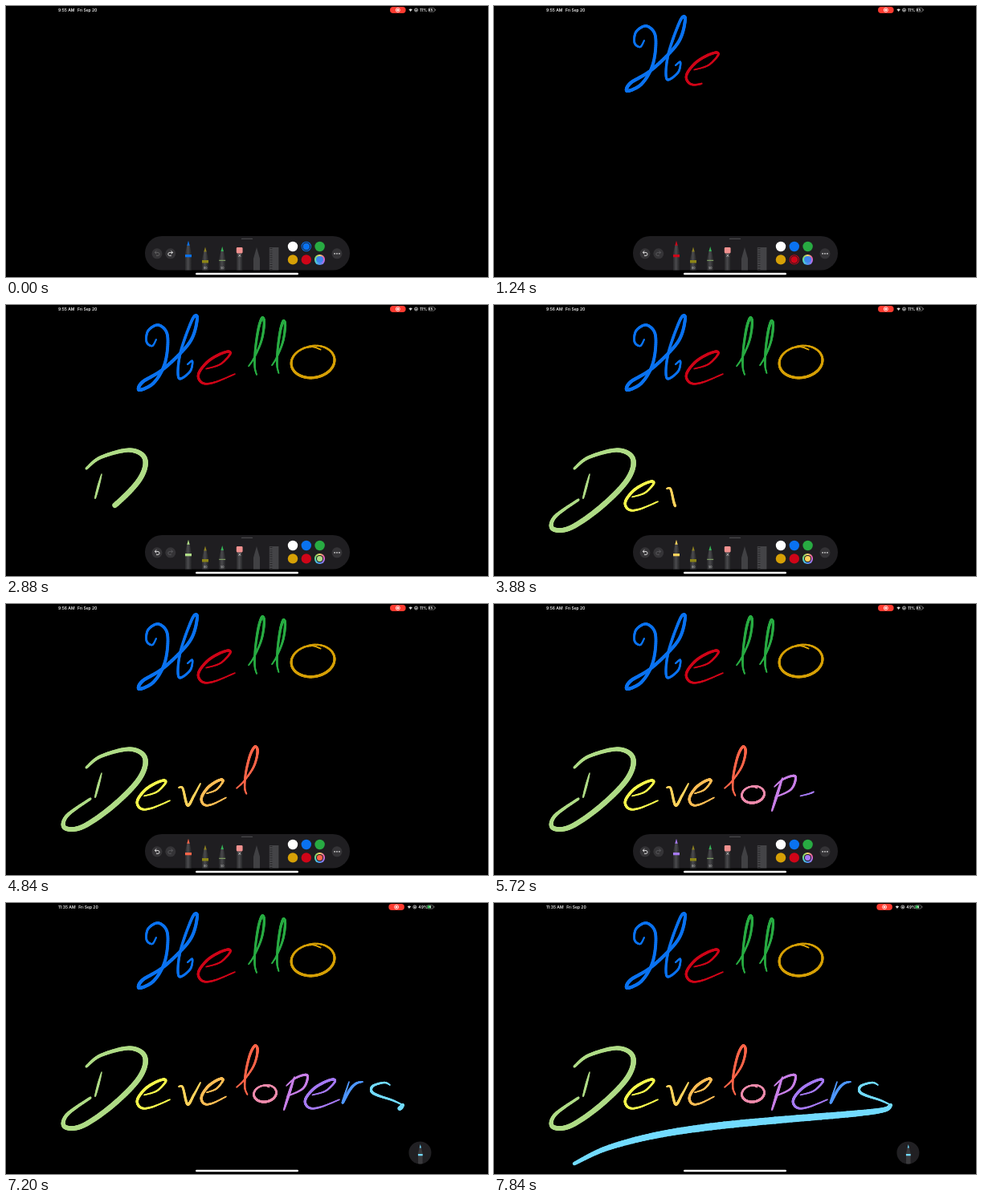
An HTML page with a canvas that plays this animation: 600x338 px, repeating every 7880 ms.

```html
<!DOCTYPE html>
<html lang="en">
<head>
<meta charset="utf-8">
<title>Hello Developers</title>
<style>
  html, body { margin: 0; width: 100%; height: 100%; overflow: hidden; background: #000; }
  canvas, svg { position: absolute; left: 0; top: 0; width: 600px; height: 338px; }
  text { font: 600 5px Inter, sans-serif; fill: #eee; }
  .wheel { position: absolute; left: 384.3px; top: 310.2px; width: 12.4px; height: 12.4px; border-radius: 50%;
    background: conic-gradient(#f5d76a, #ef5da8, #a874f0, #4b8df0, #4fd0d8, #7fdc6a, #f5d76a); }
  .wheel i { position: absolute; inset: 2px; border-radius: 50%; }
</style>
</head>
<body>
<canvas id="ink" width="600" height="338"></canvas>

<svg viewBox="0 0 600 338" fill="none">
  <defs>
    <linearGradient id="barrel">
      <stop stop-color="#29292b"/><stop offset=".45" stop-color="#4a4a4d"/><stop offset="1" stop-color="#222224"/>
    </linearGradient>
    <clipPath id="trayClip"><rect x="173" y="287" width="255" height="42.5" rx="21"/></clipPath>
    <clipPath id="screenClip"><rect width="541.5" height="338"/></clipPath>
    <clipPath id="puckClip"><circle r="18.5"/></clipPath>
    <path id="arrow" d="M-.7 -3.4L-2.8 -1.4L-.7 .6M-2.6 -1.4H1Q3 -1.2 3 .7T1 2.6H-1" stroke-width=".9"/>
  </defs>

  <text id="clock" x="65" y="6.8"></text>
  <text id="date" y="6.8">Fri Sep 20</text>
  <g id="status">
    <rect x="478" y="1" width="19.6" height="8" rx="4" fill="#ff3b30"/>
    <circle cx="487.8" cy="5" r="2.5" stroke="#fff" stroke-width=".8"/>
    <circle cx="487.8" cy="5" r="1.3" fill="#fff"/>
    <path d="M501.4 4.2Q503.6 2.6 505.8 4.2L503.6 7Z" fill="#ddd"/>
    <circle cx="510.5" cy="5" r="2" stroke="#ddd" stroke-width=".8"/>
    <path d="M509.7 4.6h1.6v1.4h-1.6z" fill="#ddd"/>
    <text id="charge" x="515" y="6.8"></text>
    <rect x="525.8" y="2.7" width="7.8" height="4.4" rx="1.3" stroke="#999" stroke-width=".6"/>
    <rect id="level" x="526.4" y="3.3" height="3.2" rx=".7"/>
    <path d="M530.2 2.6l-1.6 2.6h1.4l-.5 2.1 1.8-2.8h-1.4z" fill="#fff"/>
    <path d="M534.6 4v1.8" stroke="#999" stroke-width=".7"/>
  </g>

  <g id="tray">
    <rect x="173" y="287" width="255" height="42.5" rx="21" fill="#1f1e21"/>
    <path d="M293.5 290.4h13" stroke="#48484b" stroke-width="1.3" stroke-linecap="round"/>
    <path d="M188 308.8h0M204.8 308.8h0M412 308.8h0" stroke="#353437" stroke-width="13" stroke-linecap="round"/>
    <use id="undo" href="#arrow" transform="translate(188 308.8)"/>
    <use id="redo" href="#arrow" transform="translate(204.8 308.8) scale(-1 1)"/>
    <path d="M409.1 308.8h6" stroke="#ddd" stroke-width="1.8" stroke-linecap="round" stroke-dasharray="0 2.9"/>
    <g id="tools" clip-path="url(#trayClip)">
      <path d="M287 308h7.6v22h-7.6z" fill="url(#barrel)"/>
      <rect x="286.8" y="301" width="7.8" height="7.4" rx="1.4" fill="#f0918f"/>
      <path d="M289.4 309.8l2.8 3m0-3l-2.8 3" stroke="#ccc" stroke-width=".8"/>
      <path d="M312 301l-4 14v15h8v-15z" fill="#414144"/>
      <path d="M327.8 301h11.6v29h-11.6z" fill="#444447"/>
      <path d="M330 302v28" stroke="#1f1e21" stroke-width="3" stroke-dasharray=".7 2.2"/>
      <text x="246" y="327.5" style="font-size:3.5px;fill:#aaa">80</text>
      <text x="267.2" y="327.5" style="font-size:3.5px;fill:#aaa">50</text>
    </g>
    <g id="swatches"></g>
  </g>

  <g clip-path="url(#screenClip)">
    <g id="puck">
      <circle r="18.5" fill="#212023"/>
      <g clip-path="url(#puckClip)">
        <path d="M-1 -8L-3.2 1V22H4.2V1L2 -8Z" fill="#3a3a3d"/>
        <path class="accent" d="M.5 -14l-1.5 6h3zM-3.3 2h7.6v3h-7.6z"/>
      </g>
    </g>
  </g>
  <rect x="236" y="332.7" width="128" height="2.6" rx="1.3" fill="#fff"/>
</svg>
<div class="wheel" id="wheel"><i id="gap"></i><i id="core"></i></div>

<script>
const LOOP = 7880, CUT = 6600, PICK_LEAD = 100;
const $ = id => document.getElementById(id);
const ctx = $('ink').getContext('2d');
const clamp = v => Math.max(0, Math.min(1, v));
const lerp = (a, b, k) => a + (b - a) * k;

const BLUE = '#0a72f0', RED = '#cf0518', GREEN = '#28ab42', GOLD = '#d6a006', CYAN = '#72dbff';
const LIME = '#afdc86', LEMON = '#f6f84c', AMBER = '#ffd35c', PEACH = '#ffbd55', CORAL = '#ff6549';
const PINK = '#ee8bac', ORCHID = '#c97fe8', VIOLET = '#a67af5', SKY = '#4f97ff';

const path = text => text.split(' ').map(s => s.split(',').map(Number));
// Letter shapes in a unit box, placed wherever the letter occurs.
const E = path('.22,.54 .6,.4 .86,.1 .82,0 .56,.1 .26,.32 .04,.63 .02,.85 .17,1 .48,.95 1,.7');
const L = path('0,.85 .35,.7 .8,.4 .97,.1 .85,0 .62,.18 .42,.55 .38,.85 .5,1');
const place = (shape, x, y, w, h) => shape.map(([u, v]) => [x + u * w, y + v * h]);
// Counter-clockwise loop that starts inside and overlaps its own beginning.
const oval = (cx, cy, rx, ry) => Array.from({ length: 16 }, (_, i) => {
  const a = -1.1 - i * .48, r = 1 - .2 * Math.exp(-i);
  return [cx + rx * r * Math.cos(a), cy + ry * r * (Math.sin(a) - .1 * Math.cos(a))];
});

// Samples a Catmull-Rom curve through the points.
function smooth(p) {
  const at = i => p[Math.max(0, Math.min(p.length - 1, i))];
  return Array.from({ length: (p.length - 1) * 14 + 1 }, (_, n) => {
    const i = Math.floor(n / 14), t = n / 14 - i;
    return [0, 1].map(d => {
      const [a, b, c, e] = [-1, 0, 1, 2].map(j => at(i + j)[d]);
      return b + t * (c - a + t * (2 * a - 5 * b + 4 * c - e + t * (3 * b - a - 3 * c + e))) / 2;
    });
  });
}

const strokes = [];
const stroke = (color, start, time, width, points) =>
  strokes.push({ color, start, time, width, pts: smooth(points) });

stroke(BLUE, 20, 840, 4.2, path('187,43 182,51 175,46 177,32 190,25 201,38 198,72 184,97 166,106 170,96 197,79 229,46 238,17 232,18 217,60 215,91 229,83 232,70 226,74'));
stroke(RED, 1000, 270, 3.4, place(E, 239, 58, 46, 40));
stroke(GREEN, 1460, 220, 3.4, place(L, 302, 16, 20, 71));
stroke(GREEN, 1740, 200, 3.4, place(L, 331, 20, 17, 65));
stroke(GOLD, 2060, 310, 3.3, oval(382, 70.7, 27, 20));
stroke(LIME, 2480, 90, 3, path('119,211 111,241'));
stroke(LIME, 2620, 470, 6.6, path('100,204 118,190 154,181 173,192 166,218 133,252 95,278 73,279 76,264 105,243'));
stroke(LEMON, 3320, 320, 3.5, place(E, 163, 220, 41, 36));
stroke(AMBER, 3770, 230, 3.3, path('215,229 220,230 226,251 234,239 242,224'));
stroke(PEACH, 4180, 300, 3.4, place(E, 243, 219, 31, 32));
stroke(CORAL, 4620, 230, 3.3, place(L, 287, 178, 27, 61));
stroke(PINK, 4960, 210, 3, oval(322.5, 237.5, 14, 10.5));
stroke(ORCHID, 5290, 110, 3.5, path('359,217 353,236 346,258'));
stroke(ORCHID, 5420, 170, 3, path('349,228 361,218 375,215 370,231 350,241'));
stroke(VIOLET, 5690, 290, 3.4, place(E, 372, 220, 43, 36));
stroke(SKY, 6130, 260, 3.3, path('427,223 419,249 428,233 436,225 444,223'));
stroke(CYAN, 6740, 400, 3.2, path('478,227 471,224 457,228 455,235 463,240 481,246 494,252'));
stroke(CYAN, 7140, 560, 9, path('494,252 485,258 445,263 350,271 270,279 200,290 140,306 100,325'));

const basics = ['#fff', BLUE, GREEN, GOLD, RED];
$('swatches').innerHTML = basics.map((c, i) =>
  `<g transform="translate(${357 + i % 3 * 16.8} ${i < 3 ? 300 : 316.4})"><circle r="6.2" fill="${c}"/>
   <circle class="ring" r="4.8" stroke="#1f1e21"/></g>`).join('');

const pen = (x, top, tip, bandY, bandH, band) => `
  <path d="M${x - 1.5} ${top + 5}l-2.5 11V330h8V${top + 16}l-2.5 -11z" fill="url(#barrel)"/>
  <path ${tip} d="M${x} ${top}l-1.7 6h3.4z"/><path ${band} d="M${x - 4} ${bandY}h8v${bandH}h-8z"/>`;
const fill = c => `fill="${c}"`;
$('tools').insertAdjacentHTML('afterbegin',
  pen(227, 292.8, 'class="accent"', 309.9, 3.3, 'class="accent"') +
  pen(248, 300.5, fill('#8c8020'), 317, 3.6, fill('#8c8517')) +
  pen(269.2, 300, fill('#35b557'), 316.8, 1.3, fill('#7c9a62')));
const rings = document.querySelectorAll('.ring');
const accents = document.querySelectorAll('.accent');

function drawInk(t) {
  ctx.clearRect(0, 0, 600, 338);
  ctx.lineCap = 'round';
  for (const { color, start, time, width, pts } of strokes) {
    const last = Math.floor(clamp((t - start) / time) * (pts.length - 1));
    ctx.strokeStyle = color;
    for (let i = 0; i < last; i++) {
      // Pen pressure swells towards the middle of each stroke.
      ctx.lineWidth = width * (.45 + .55 * Math.sin(Math.PI * i / pts.length));
      ctx.beginPath();
      ctx.moveTo(...pts[i]);
      ctx.lineTo(...pts[i + 1]);
      ctx.stroke();
    }
  }
}

function drawStatus(t, late) {
  $('clock').textContent = late ? '11:35 AM' : t < 3240 ? '9:55 AM' : '9:56 AM';
  $('date').setAttribute('x', late ? 90.3 : 89);
  $('status').setAttribute('transform', `translate(${late ? -1.7 : 0} 0)`);
  $('charge').textContent = late ? '49%' : '11%';
  $('level').setAttribute('width', late ? 4 : 1.4);
  $('level').setAttribute('fill', late ? '#34c759' : '#eee');
}

function drawTools(t, late) {
  const { color } = strokes.findLast(s => s.start - PICK_LEAD <= t);
  const picked = basics.indexOf(color), custom = picked < 0, fresh = t < 40;
  accents.forEach(a => a.setAttribute('fill', color));
  rings.forEach((r, i) => r.style.display = i === picked ? '' : 'none');
  $('undo').setAttribute('stroke', fresh ? '#666' : '#eee');
  $('redo').setAttribute('stroke', fresh ? '#eee' : '#5c5c5f');
  $('tray').style.display = $('wheel').style.display = late ? 'none' : '';
  $('gap').style.background = custom ? '#1f1e21' : 'none';
  $('core').style.background = custom ? color : '#3f86ee';
  $('core').style.inset = custom ? '2.8px' : '2.2px';

  $('puck').style.display = late ? '' : 'none';
  const e = 1 - (1 - clamp((t - 6640) / 160)) ** 3;
  $('puck').setAttribute('transform',
    `translate(${lerp(527.3, 515.4, e)} ${lerp(305.4, 311.5, e)}) scale(${lerp(1, .757, e)})`);
}

const begin = performance.now();
function frame() {
  const t = (performance.now() - begin) % LOOP, late = t >= CUT;
  drawInk(t);
  drawStatus(t, late);
  drawTools(t, late);
  requestAnimationFrame(frame);
}
frame();
</script>
</body>
</html>
```
